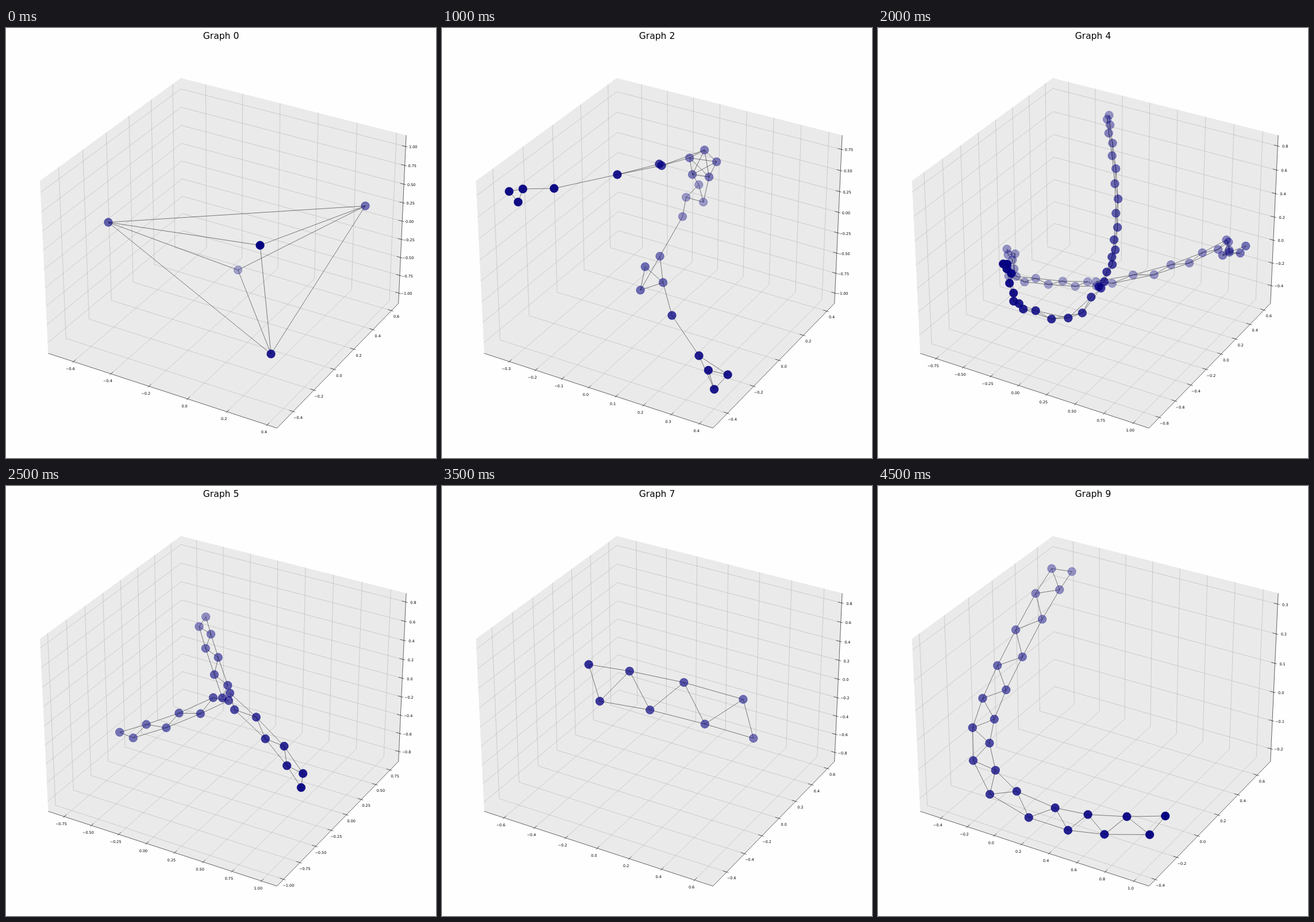
Animation of 748x748 px, one loop 5000 ms. Source, as an HTML page with a canvas:

```html
<!DOCTYPE html>
<html lang="en">
<head>
<meta charset="utf-8">
<title>Graphs</title>
<style>
  html, body { margin: 0; width: 100%; height: 100%; overflow: hidden; background: #fefefe; }
  canvas { display: block; }
</style>
</head>
<body>
<canvas id="stage" width="748" height="748"></canvas>
<script>
const ctx = document.getElementById('stage').getContext('2d');
const HOLD = 500;
const FONT = '"DejaVu Sans", sans-serif';
const PAPER = '#fefefe', PANE = '#eaeaea', GRID = '#b0b0b0', LINK = 'rgba(0,0,0,0.52)', NODE = '#040080';

const mix = (a, b, t) => a + (b - a) * t;

// Perspective view of a box whose sides run from -1 to 1 on each axis.
function project([x, y, z]) {
  const right = 0.4949 * x + 0.2857 * y;
  const up = -0.1429 * x + 0.2474 * y + 0.3712 * z;
  const depth = 9.6 - (0.2474 * x - 0.4286 * y + 0.2143 * z);
  return [383.7 + 3829 * right / depth, 376.9 - 3829 * up / depth];
}

function path(points) {
  ctx.beginPath();
  points.forEach(([x, y]) => ctx.lineTo(x, y));
}

function line(color, width, points) {
  path(points);
  ctx.strokeStyle = color;
  ctx.lineWidth = width;
  ctx.stroke();
}

function text(label, x, y, size) {
  ctx.font = `${size}px ${FONT}`;
  ctx.fillStyle = '#000';
  ctx.textAlign = 'center';
  ctx.fillText(label, x, y + size * 0.365);
}

const AXES = [
  { grid: t => [[t, -1, -1], [t, 1, -1], [t, 1, 1]],
    tick: t => [[t, -1.016, -1], [t, -0.968, -1]],
    edge: t => [t, -1, -1], shift: [-5.4, 12.4] },
  { grid: t => [[1, t, -1], [-1, t, -1], [-1, t, 1]],
    tick: t => [[1.016, t, -1], [0.968, t, -1]],
    edge: t => [1, t, -1], shift: [8.5, 10.5] },
  { grid: t => [[-1, -1, t], [-1, 1, t], [1, 1, t]],
    tick: t => [[1.016, 1, t], [0.968, 1, t]],
    edge: t => [1, 1, t], shift: [13, 0.8] }
];

// Ticks at round values: the finest step that leaves fewer than ten of them.
function ticks([low, high]) {
  const step = [0.1, 0.2, 0.25].find(s => (high - low) / s < 9.5);
  const marks = [];
  for (let i = Math.ceil(low / step); i * step < high; i++) {
    const label = Math.abs(i * step).toFixed(step === 0.25 ? 2 : 1);
    marks.push({ t: 2 * (i * step - low) / (high - low) - 1, label: (i < 0 ? '\u2212' : '') + label });
  }
  return marks;
}

function drawBox(limits) {
  const line3d = (color, width, points) => line(color, width, points.map(project));
  const outline = [[-1, 1, 1], [-1, -1, 1], [-1, -1, -1], [1, -1, -1], [1, 1, -1], [1, 1, 1]];
  path(outline.map(project));
  ctx.fillStyle = PANE;
  ctx.fill();
  const marks = limits.map(ticks);
  AXES.forEach((axis, i) => marks[i].forEach(({ t }) => line3d(GRID, 0.55, axis.grid(t))));
  AXES.forEach((axis, i) => {
    line3d('#000', 0.6, [axis.edge(-1), axis.edge(1)]);
    marks[i].forEach(({ t, label }) => {
      line3d('#000', 0.6, axis.tick(t));
      const [x, y] = project(axis.edge(t));
      text(label, x + axis.shift[0], y + axis.shift[1], 6.49);
    });
  });
}

function drawNetwork({ nodes, edges }) {
  edges.forEach(ends => line(LINK, 0.95, ends));
  ctx.fillStyle = ctx.strokeStyle = NODE;
  ctx.lineWidth = 0.65;
  [...nodes].sort((a, b) => a[2] - b[2]).forEach(([x, y, alpha]) => {
    ctx.globalAlpha = alpha;
    ctx.beginPath();
    ctx.arc(x, y, 7.3, 0, 2 * Math.PI);
    ctx.fill();
    ctx.stroke();
  });
  ctx.globalAlpha = 1;
}

// A node is [x, y, opacity]. Nodes at most span places apart are linked; a hub is linked to all.
function link(nodes, span, hub) {
  const edges = nodes.flatMap((a, i) => nodes
    .filter((_, j) => j > i && (j - i <= span || i === hub || j === hub))
    .map(b => [a, b]));
  return { nodes, edges };
}

const join = (...parts) => ({
  nodes: parts.flatMap(p => p.nodes), edges: parts.flatMap(p => p.edges)
});

// Smooth curve through the keys, t from 0 to 1.
function curve(keys, t) {
  const pos = t * (keys.length - 1);
  const i = Math.min(Math.floor(pos), keys.length - 2);
  const u = pos - i;
  const key = k => keys[Math.min(Math.max(k, 0), keys.length - 1)];
  return [0, 1].map(d => {
    const [a, b, c, e] = [-1, 0, 1, 2].map(k => key(i + k)[d]);
    return b + u / 2 * (c - a + u * (2 * a - 5 * b + 4 * c - e + u * (3 * (b - c) + e - a)));
  });
}

// Nodes that zigzag by sway pixels around a curve.
function strand(count, sway, from, to, ...keys) {
  const nodes = Array.from({ length: count }, (_, i) => {
    const t = i / (count - 1);
    const [x, y] = curve(keys, t);
    const [x0, y0] = curve(keys, Math.max(0, t - 0.01));
    const [x1, y1] = curve(keys, Math.min(1, t + 0.01));
    const side = (i % 2 ? sway : -sway) / Math.hypot(x1 - x0, y1 - y0);
    return [x - (y1 - y0) * side, y + (x1 - x0) * side, mix(from, to, t)];
  });
  return link(nodes, 2);
}

// Rings of fully linked nodes, each [x, y, opacity, count, radius, tilt], joined in a row.
function rings(...list) {
  const groups = list.map(([x, y, alpha, count = 1, radius = 0, tilt = -1.9]) =>
    link(Array.from({ length: count }, (_, i) => {
      const angle = tilt + 2 * Math.PI * i / count;
      return [x + radius * Math.cos(angle), y + radius * Math.sin(angle), alpha];
    }), count));
  const gap = (a, b) => Math.hypot(a[0] - b[0], a[1] - b[1]);
  const bridges = groups.slice(1).flatMap(({ nodes }, i) => nodes.slice(0, 2).map(node =>
    [node, groups[i].nodes.reduce((a, b) => gap(node, a) < gap(node, b) ? a : b)]));
  return join(...groups, { nodes: [], edges: bridges });
}

// Random arms, each [tip x, tip y, root x, root y, count, opacity], that widen toward the root.
function cloud(seed, ...arms) {
  const random = () => (seed = seed * 16807 % 2147483647) / 2147483647;
  const bell = () => random() + random() + random() - 1.5;
  return join(...arms.map(([x0, y0, x1, y1, count, alpha]) =>
    link(Array.from({ length: count }, (_, i) => {
      const t = i / count;
      const spread = 5 + 28 * t;
      return [mix(x0, x1, t) + bell() * spread, mix(y0, y1, t) + bell() * spread,
              Math.min(1, Math.max(0.3, alpha + bell() * 0.35))];
    }), 1)));
}

const WIDE = [-0.899, 1.132];

const graphs = [
  { limits: [[-0.737, 0.448], [-0.551, 0.677], [-1.146, 1.148]],
    network: link([[442, 378, 1], [178, 338, 0.6], [625, 309.5, 0.53], [461, 567, 0.88], [403.5, 421, 0.32]], 3) },

  { limits: [[-1.133, 0.962], [-0.879, 1.073], [-0.938, 0.833]],
    network: cloud(71,
      [391, 220, 402, 325, 40, 0.65],
      [480, 248, 410, 320, 30, 0.55],
      [280, 295, 400, 315, 34, 0.6],
      [250, 340, 375, 355, 46, 0.55],
      [486, 325, 425, 310, 36, 0.7],
      [508, 375, 400, 365, 50, 0.95],
      [606, 388, 430, 413, 48, 0.85],
      [255, 433, 385, 405, 42, 0.95],
      [260, 460, 350, 420, 36, 0.85],
      [235, 503, 365, 465, 32, 0.8],
      [409, 582, 435, 455, 42, 0.85],
      [455, 480, 365, 385, 50, 0.9],
      [388, 530, 410, 430, 14, 0.9]) },

  { limits: [[-0.397, 0.447], [-0.507, 0.466], [-1.13, 0.916]],
    network: rings(
      [130, 289, 0.95, 3, 14, -0.7], [195, 279, 0.95], [305, 255, 0.9], [380, 238, 0.75, 2, 2.5, 0.6],
      [453, 237, 0.48, 5, 25, 3.6], [442, 290, 0.35, 3, 18, -1.3], [418.5, 328, 0.4], [379, 397, 0.5],
      [361, 438, 0.55, 3, 24, 0.2], [400, 500, 0.75], [447, 570, 0.88], [478, 609, 0.9, 3, 20, -0.3]) },

  { limits: [WIDE, [-0.73, 0.69], [-0.73, 0.94]],
    network: join(
      strand(8, 8, 0.7, 0.4, [372, 372], [420, 318], [485, 265]),
      strand(8, 8, 0.7, 1, [372, 372], [310, 445], [240, 500]),
      strand(8, 8, 0.7, 0.5, [372, 372], [470, 424], [590, 458])) },

  { limits: [WIDE, [-0.928, 0.694], [-0.559, 0.889]],
    network: join(
      strand(18, 2, 0.8, 0.38, [386, 451], [405, 413], [412, 375], [416, 310], [411, 237], [403, 180], [400, 152]),
      strand(15, 4, 0.33, 0.52, [380, 445], [473, 427], [556, 399], [612, 371], [604, 395], [641, 383]),
      strand(14, 4, 0.33, 0.38, [380, 445], [330, 445], [270, 439], [232, 432], [238, 400], [222, 388]),
      strand(15, 2.5, 0.75, 1, [386, 451], [336, 506], [260, 489], [236, 470], [229, 425], [220, 409])) },

  { limits: [WIDE, [-1.1, 0.9], [-0.91, 0.89]],
    network: join(
      strand(8, 8, 0.65, 0.4, [384, 366], [358, 290], [340, 230]),
      strand(8, 8, 0.65, 0.95, [384, 366], [468, 446], [520, 520]),
      strand(8, 8, 0.65, 0.5, [384, 366], [290, 408], [200, 436])) },

  { limits: [[-0.607, 0.871], [-0.963, 1.143], [-0.757, 0.825]],
    network: rings(
      [315, 370, 0.36, 6, 23], [285, 384, 0.6, 3, 14, 1.7], [301, 389, 0.8, 2, 1.5, 1],
      [344, 389, 0.9, 2, 4.5, 0], [407, 387.5, 0.92], [458, 387, 1, 3, 23]) },

  { limits: [[-0.73, 0.71], [-0.75, 0.69], [-0.9, 0.9]],
    network: strand(8, 30, 0.8, 0.5, [250, 340], [390, 365], [550, 410]) },

  { limits: [[-0.649, 0.697], [-1.105, 0.885], [-1.129, 0.909]],
    network: link([[209.5, 319, 0.9], [482.5, 377.5, 1], [394.5, 239, 0.73], [380.5, 381.5, 0.65],
                   [428, 281.5, 0.43], [291, 388, 0.32], [535, 442.5, 0.42]], 2, 3) },

  { limits: [[-0.557, 1.104], [-0.458, 0.743], [-0.245, 0.336]],
    network: strand(25, 16, 0.36, 1,
      [324, 140], [288, 195], [237, 290], [197, 375], [178, 448], [206, 525], [303, 575], [395, 590], [500, 590]) }
];

let shown = -1;

function frame(now) {
  const index = Math.floor(now / HOLD) % graphs.length;
  if (index !== shown) {
    shown = index;
    ctx.fillStyle = PAPER;
    ctx.fillRect(0, 0, 748, 748);
    drawBox(graphs[index].limits);
    drawNetwork(graphs[index].network);
    text(`Graph ${index}`, 374, 13.6, 15.58);
  }
  requestAnimationFrame(frame);
}

frame(performance.now());
</script>
</body>
</html>
```
